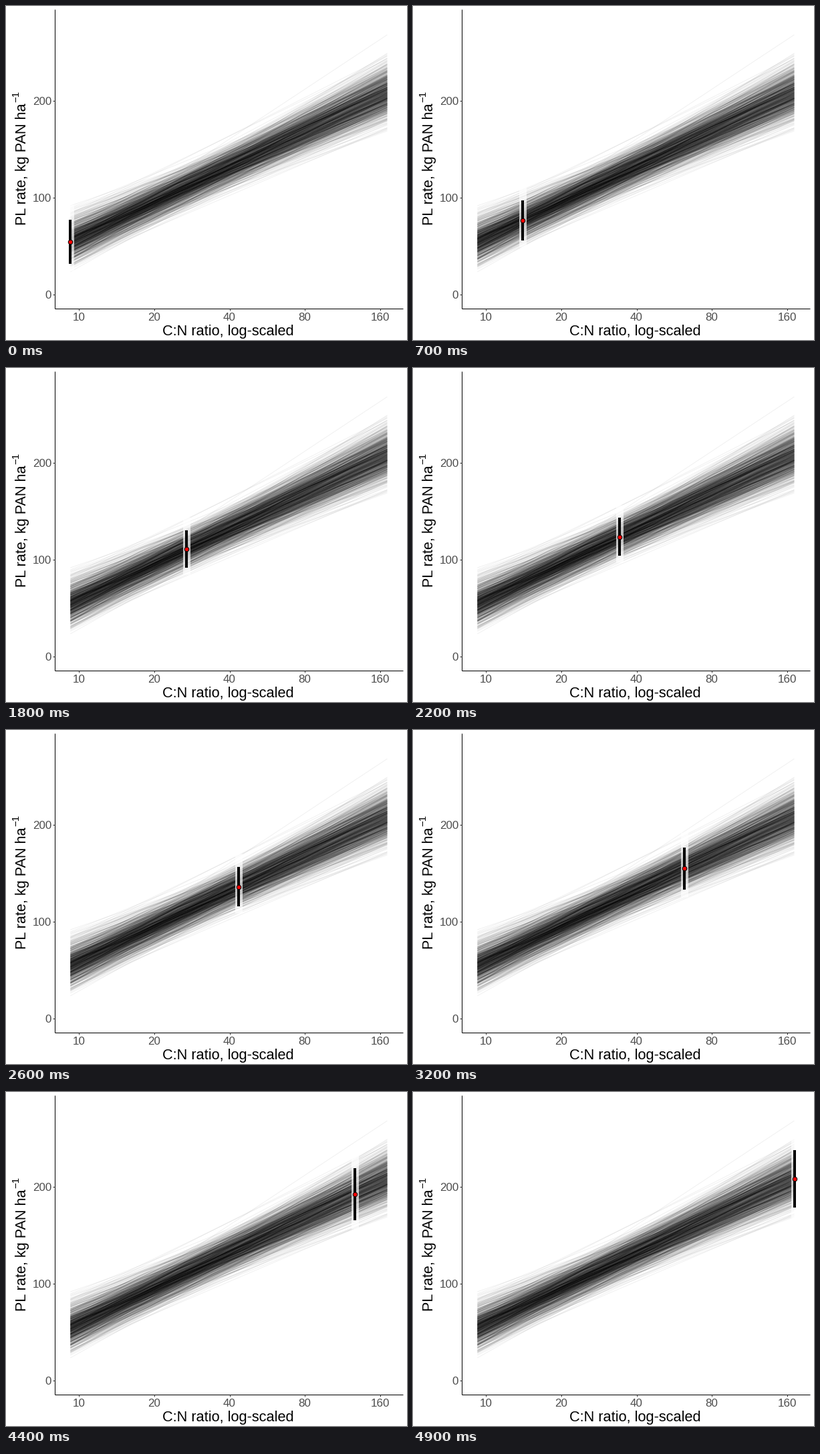
A matplotlib script that plays this animation: 600 by 500 pixels, repeating every 5000 ms.

```python
import numpy as np
import matplotlib.pyplot as plt
from matplotlib.animation import FuncAnimation
from matplotlib.collections import LineCollection

WIDTH, HEIGHT, DPI = 600, 500, 100
PX = 72 / DPI  # points per pixel
FRAMES, INTERVAL = 50, 100
X_LEFT, X_RIGHT = 96.3, 570.5
Y_LEFT, Y_RIGHT = 353.0, 130.0

plt.rcParams["font.family"] = "Liberation Sans"
fig = plt.figure(figsize=(WIDTH / DPI, HEIGHT / DPI), dpi=DPI, facecolor="white")
ax = fig.add_axes([0, 0, 1, 1])
ax.set_xlim(0, WIDTH)
ax.set_ylim(HEIGHT, 0)
ax.axis("off")


def label(x, y, text, size, color="black", **kw):
    kw = {"ha": "center", "va": "baseline", **kw}
    ax.text(x, y, text, fontsize=size * PX, color=color, **kw)


def stroke(xs, ys, color="black", width=1, **kw):
    return ax.plot(xs, ys, color=color, lw=width * PX,
                   solid_capstyle="butt", **kw)[0]


def spread(z, sd, up, down):
    """Scale normal draws and bend the tails so they end at the given limits."""
    high, low = z.max(), -z.min()
    above = sd * z + (up - sd * high) * (z / high) ** 3
    below = sd * z + (down - sd * low) * (z / low) ** 3
    return np.where(z > 0, above, below)


def posterior_lines(count=900, correlation=0.16):
    rng = np.random.default_rng(12)
    z1, z2 = rng.standard_normal((2, count))
    z2 = correlation * z1 + np.sqrt(1 - correlation ** 2) * z2
    starts = Y_LEFT - spread(z1, 16.3, 54, 45)
    ends = Y_RIGHT - spread(z2, 20, 87, 57)
    return [[(X_LEFT, a), (X_RIGHT, b)] for a, b in zip(starts, ends)]


def half_interval(t):
    return np.sqrt(784 + 2450 * (t - 0.35) ** 2)


ax.add_collection(LineCollection(posterior_lines(), colors="black", alpha=0.06,
                                 linewidths=PX, zorder=1))

# Axes
stroke([73.2, 73.2], [5, 453])
stroke([73, 594], [452.8, 452.8])
for i in range(5):
    x = 109.2 + 112.65 * i
    stroke([x, x], [453, 456], "#333333")
    label(x, 471.3, str(10 * 2 ** i), 17, "#4d4d4d")
for value in (0, 100, 200):
    y = 431.8 - 1.45 * value
    stroke([70, 73], [y, y], "#333333")
    label(68.2, y + 6.6, str(value), 17, "#4d4d4d", ha="right")
label(332.5, 493.3, "C:N ratio, log-scaled", 21.8)
upright = dict(rotation=90, rotation_mode="anchor", ha="left")
label(30.2, 328, "PL rate, kg PAN ha", 21.6, **upright)
label(19, 144.3, "\u22121", 15, **upright)

# Moving interval
halo = stroke([], [], "white", 11, alpha=0.7, zorder=3)
bar = stroke([], [], "black", 4, zorder=4)
dot, = ax.plot([], [], "o", ms=6.5 * PX, mfc="red", mec="black",
               mew=PX, snap=False, zorder=5)


def draw(frame):
    t = frame / (FRAMES - 1)
    x = X_LEFT + (X_RIGHT - X_LEFT) * t
    y = Y_LEFT + (Y_RIGHT - Y_LEFT) * t
    half = half_interval(t)
    halo.set_data([x, x], [y - 1.7 * half, y + 1.35 * half])
    bar.set_data([x, x], [y - half, y + half])
    dot.set_data([x], [y])
    return halo, bar, dot


animation = FuncAnimation(fig, draw, frames=FRAMES, interval=INTERVAL,
                          repeat=True, repeat_delay=0)
plt.show()
```
